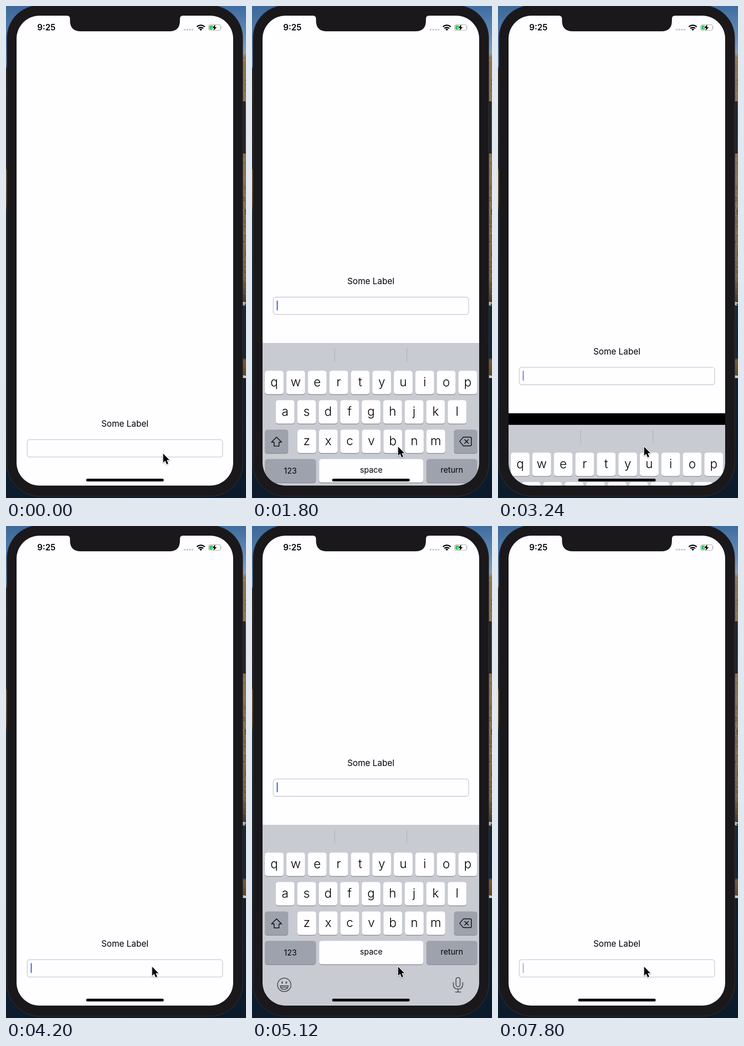
Recreate the animation shown at these times as an HTML page. Size 523 by 1070 pixels, loop 7840 ms.

```html
<!DOCTYPE html>
<html lang="en">
<head>
<meta charset="utf-8">
<title>Keyboard demo</title>
<style>
  html, body { margin: 0; width: 100%; height: 100%; overflow: hidden; background: #0d1a28; }
  svg { display: block; width: 523px; height: 1070px; font-family: Inter, sans-serif; }
  text { text-anchor: middle; }
  .letter { font-size: 27px; font-weight: 300; }
  .word { font-size: 17.2px; }
  .icon { fill: none; stroke: #111; stroke-width: 1.7; stroke-linejoin: round; stroke-linecap: round; }
  .soft { stroke: #54575d; stroke-width: 2; }
</style>
</head>
<body>
<svg viewBox="0 0 523 1070">
  <defs>
    <linearGradient id="leftEdge" x1="0" y1="0" x2="0" y2="1">
      <stop offset="0" stop-color="#3d6898"/><stop offset=".12" stop-color="#6d94bb"/>
      <stop offset=".13" stop-color="#2b2a2c"/><stop offset=".33" stop-color="#2b2a2c"/>
      <stop offset=".335" stop-color="#7d6748"/><stop offset=".4" stop-color="#6a563c"/>
      <stop offset=".42" stop-color="#1a2a38"/><stop offset="1" stop-color="#0c1c2d"/>
    </linearGradient>
    <linearGradient id="rightEdge" x1="0" y1="0" x2="0" y2="1">
      <stop offset="0" stop-color="#3f6c9f"/><stop offset=".07" stop-color="#6a93bd"/>
      <stop offset=".095" stop-color="#8d9fae"/><stop offset=".105" stop-color="#8b7552"/>
      <stop offset=".35" stop-color="#8a7250"/><stop offset=".55" stop-color="#7d6645"/>
      <stop offset=".6" stop-color="#463c2d"/><stop offset=".612" stop-color="#16293a"/>
      <stop offset=".715" stop-color="#12263a"/><stop offset=".72" stop-color="#765a38"/>
      <stop offset=".748" stop-color="#5f4a30"/><stop offset=".758" stop-color="#10202f"/>
      <stop offset="1" stop-color="#0b1b2c"/>
    </linearGradient>
    <clipPath id="screen"><rect x="23" y="21" width="472" height="1022" rx="50"/></clipPath>
  </defs>

  <rect width="262" height="1070" fill="url(#leftEdge)"/>
  <rect x="262" width="261" height="1070" fill="url(#rightEdge)"/>
  <g id="rock"></g>
  <path d="M516 643l7 2v2l-5 1 5 3h-7zM516 803l7 1v5h-7z" fill="#c9cac8"/>

  <g fill="#252326">
    <rect x="0" y="135" width="4" height="39"/>
    <rect x="0" y="207" width="4" height="78"/>
    <rect x="0" y="288" width="4" height="65"/>
    <rect x="514" y="207" width="8" height="114" rx="2"/>
  </g>
  <rect x="2" y="-1.5" width="514" height="1067.5" rx="71" fill="#1a181b" stroke="#353437"/>

  <g clip-path="url(#screen)">
    <rect x="23" y="21" width="472" height="1022"/>
    <g id="view">
      <rect x="23" y="0" width="472" height="1043" fill="#fefdff"/>
      <text x="259" y="915.3" font-size="18.5">Some Label</text>
      <rect x="46.3" y="943.2" width="425.7" height="37.6" rx="5" fill="#fefdff" stroke="#c5c4c9" stroke-width="1.3"/>
      <rect id="caret" x="53.8" y="950.5" width="2.4" height="21.5" rx="1.2" fill="#4265db"/>
    </g>
    <g id="keyboard">
      <rect x="23" width="472" height="420" fill="#c8cbd2"/>
      <path d="M180.3 11v29M337.5 11v29" stroke="#acafb6" stroke-width="1.2"/>
      <g id="keys"></g>
      <path class="icon" d="M53.5 204.5l11 11h-5.7v8.7h-10.600v-8.700h-5.700z"/>
      <path class="icon" d="M460.500 204.500h15q2.500 0 2.500 2.500v14q0 2.500-2.500 2.500h-15l-8-9.500zM463.500 210l8 8M471.500 210l-8 8"/>
      <g class="icon soft">
        <circle cx="70.300" cy="348" r="14.600"/>
        <path d="M61.500 350h17.600q-1 8-8.800 8t-8.800-8zM63 353.500h14.500"/>
        <path d="M65.800 341.500v2.500M74.800 341.500v2.500" stroke-width="3"/>
        <rect x="444.500" y="332" width="9" height="20" rx="4.500"/>
        <path d="M438.800 343v4q0 10 10.200 10t10.200-10v-4M449 357v6.500M443.500 363.500h11"/>
      </g>
    </g>
    <rect x="174.700" y="1028" width="169" height="6" rx="3"/>
  </g>

  <path d="M130 20.500h259v.5h-3q-7 0-7 7v4q0 23-23 23H163q-23.500 0-23.500-23v-4q0-7-7-7h-2.500z" fill="#1a181b"/>
  <text x="88" y="53.300" font-size="18.300" font-weight="600">9:25</text>
  <g fill="#c6c5ca">
    <circle cx="389.300" cy="51.500" r="2.100"/><circle cx="395" cy="51.500" r="2.100"/>
    <circle cx="400.600" cy="51.500" r="2.100"/><circle cx="406.200" cy="51.500" r="2.100"/>
  </g>
  <g fill="none" stroke="#000" stroke-width="2.700">
    <path d="M416 45.200a12.200 12.200 0 0 1 17 0M419.200 48.700a7.600 7.600 0 0 1 10.600 0"/>
    <path d="M424.500 53.800l-3-3a4.300 4.300 0 0 1 6 0z" fill="#000" stroke="none"/>
  </g>
  <rect x="441.500" y="40.500" width="26" height="12.500" rx="3.800" fill="none" stroke="#a4a3a7" stroke-width="1.200"/>
  <path d="M469.200 44.500q2 2.200 0 4.500z" fill="#a4a3a7"/>
  <rect x="443.200" y="42.200" width="8" height="9.200" rx="2" fill="#35c759"/>
  <path d="M456.500 39.800l-7.300 8h4.300l-1.500 6.200 7.300-8h-4.200z" stroke="#fefdff" stroke-width="2" paint-order="stroke"/>

  <path id="pointer" d="M0 0v19.500l4.400-4.200 3.300 7.700 3.300-1.500-3.300-7.400h6z" stroke="#fff" stroke-width="2.600" stroke-linejoin="round" paint-order="stroke" style="filter:drop-shadow(0 1px 1px #0005)"/>
</svg>

<script>
const LOOP = 7840, TRAVEL = 394.4, BOTTOM = 1043;
const $ = id => document.getElementById(id);

function keyMarkup(label, x, y, width, fill, cls, baseline) {
  const box = (dy, color) => `<rect x="${x}" y="${y + dy}" width="${width}" height="51" rx="5.5" fill="${color}"/>`;
  return box(1.4, '#898b90') + box(0, fill) +
    `<text class="${cls}" x="${x + width / 2}" y="${y + baseline}">${label}</text>`;
}

const WHITE = '#fefdff', GREY = '#9ea2ad';
let keys = '';
[['qwertyuiop', 28], ['asdfghjkl', 51.7], ['zxcvbnm', 99]].forEach(([row, left], r) =>
  [...row].forEach((c, i) => keys += keyMarkup(c, left + i * 46.85, 60.3 + r * 64, 40.8, WHITE, 'letter', 34)));
keys += [
  ['', 28, 188.3, 51, GREY], ['', 440, 188.3, 51, GREY],
  ['123', 28, 252.3, 111.3, GREY], ['space', 146.3, 252.3, 227, WHITE], ['return', 380, 252.3, 111, GREY]
].map(k => keyMarkup(...k, 'word', k[0] === '123' ? 31.5 : 29.7)).join('');
$('keys').innerHTML = keys;

// Seeded speckle for the rocky strip beside the phone.
let seed = 7;
const random = () => (seed = seed * 16807 % 2147483647) / 2147483647;
const tones = ['#a58d66', '#5d4a32', '#967c55', '#453829'];
let speckle = '';
for (let i = 0; i < 150; i++)
  speckle += `<rect x="${516 + random() * 6}" y="${115 + random() * 520}" width="${1 + random() * 4}" height="${1 + random() * 3}" fill="${tones[random() * 4 | 0]}" opacity=".5"/>`;
$('rock').innerHTML = speckle;

const clamp = v => Math.max(0, Math.min(1, v));

// Critically damped spring, stiffness 1000 and mass 3.
function spring(ms) {
  const x = Math.max(0, ms) / 1000 * Math.sqrt(1000 / 3);
  return 1 - (1 + x) * Math.exp(-x);
}

function raised(t, lag) {
  return spring(t - 1641) - spring(t - 3115 - lag) + spring(t - 4690) - spring(t - 5973 - lag);
}

function caretOpacity(t) {
  if (t < 760) return 0;
  if (t < 1640) return 1 - clamp((t - 1310) / 200);
  if (t < 2184) return 1;
  const phase = t - 2184, fade = clamp(phase % 502 / 200);
  return Math.floor(phase / 502) % 2 ? fade : 1 - fade;
}

function draw(t) {
  $('view').setAttribute('transform', `translate(0 ${-TRAVEL * raised(t, 14)})`);
  $('keyboard').setAttribute('transform', `translate(0 ${BOTTOM - TRAVEL * raised(t, 0)})`);
  $('caret').setAttribute('opacity', caretOpacity(t));
  const rest = (1 - clamp((t - 10) / 190)) ** 2;
  $('pointer').setAttribute('transform', `translate(${318.5 + 24 * rest} ${958.5 + 15 * rest})`);
}

const start = performance.now();
function tick() {
  const t = (performance.now() - start) % LOOP;
  draw(Math.floor(t / 40) * 40);
  requestAnimationFrame(tick);
}
tick();
</script>
</body>
</html>
```
